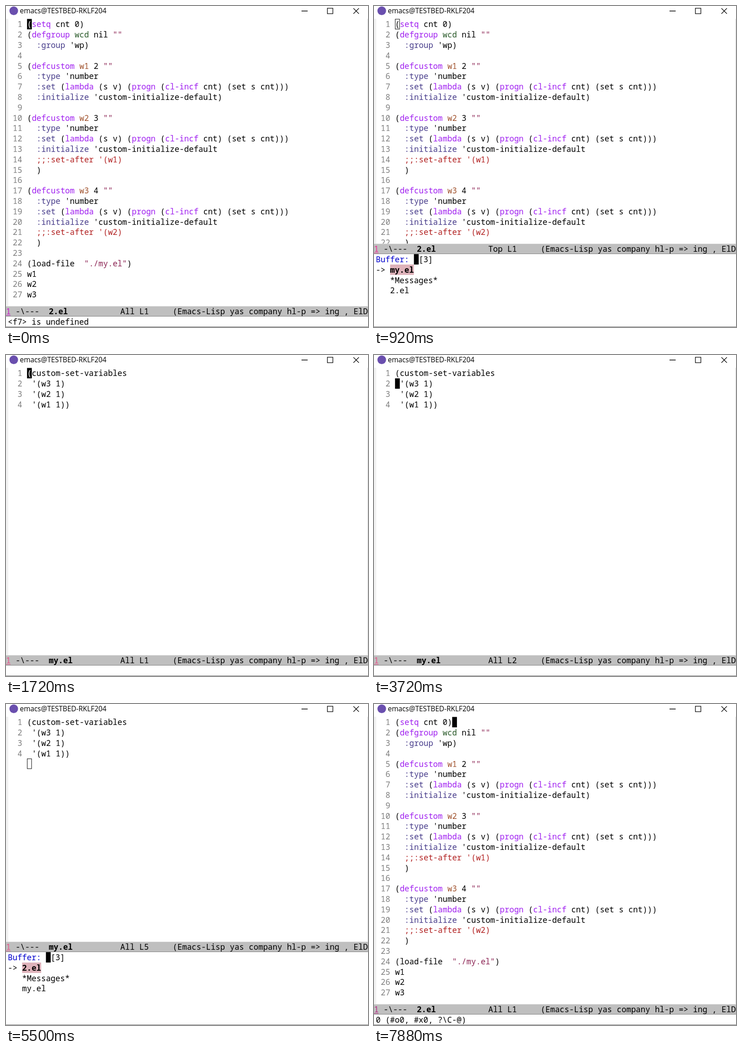
An HTML page with a canvas for the animation above (8 s loop, 795 by 704 pixels).

```html
<!DOCTYPE html>
<html lang="en">
<head>
<meta charset="utf-8">
<title>Editor session</title>
<style>
  html, body { margin: 0; width: 100%; height: 100%; overflow: hidden; background: #fff; }
  canvas { display: block; }
</style>
</head>
<body>
<canvas id="stage" width="795" height="704"></canvas>
<script>
const ctx = document.getElementById('stage').getContext('2d');
const LOOP = 8000, CELL = 10.458, ROW = 22.8;
const TEXT_X = 46.2, TEXT_Y = 28.4, BASELINE = 17.9;
const MONO = '17.43px "Noto Sans Mono", monospace';

const option = (name, value, after) => `(defcustom ${name} ${value} ""
  :type 'number
  :set (lambda (s v) (progn (cl-incf cnt) (set s cnt)))
  :initialize 'custom-initialize-default${after ? `\n  ;;:set-after '(${after})\n  ` : ''})
`;

const buffers = {
  '2.el': `(setq cnt 0)
(defgroup wcd nil ""
  :group 'wp)

${option('w1', 2)}
${option('w2', 3, 'w1')}
${option('w3', 4, 'w2')}
(load-file  "./my.el")
w1
w2
w3`.split('\n'),
  'my.el': `(custom-set-variables
 '(w3 1)
 '(w2 1)
 '(w1 1))`.split('\n')
};

const SYNTAX = new RegExp([
  '(?<comment>;;.*)',
  '(?<string>"[^"]*")',
  '(?<constant>:[a-z]+)',
  '(?<keyword>\\b(?:setq|defgroup|defcustom|lambda|progn|cl-incf)\\b)',
  '(?<variable>(?<=defcustom )w\\d)',
  '(?<type>\\bwcd\\b)',
  '(?<plain>[()]+|[^\\s:;"()]+)'
].join('|'), 'g');
const COLORS = {
  comment: '#b22222', string: '#8b2252', constant: '#483d8b', keyword: '#a020f0',
  variable: '#a0522d', type: '#2b5b2b', plain: '#000'
};

// Each entry changes only the listed properties of the state.
const timeline = [
  [0, { file: '2.el', line: 1, col: 0, echo: '<f7> is undefined', mark: '#c81ec8', choices: null, match: false }],
  [520, { echo: 'C-x-' }],
  [920, { echo: '', mark: '#ee2a96', choices: ['my.el', '*Messages*', '2.el'] }],
  [1650, { file: 'my.el', mark: '#e8528a', choices: null }],
  [3720, { line: 2 }],
  [3920, { line: 3 }],
  [4050, { line: 4, match: true }],
  [4250, { line: 5 }],
  [4450, { match: false }],
  [5240, { echo: 'C-x-' }],
  [5500, { echo: '', choices: ['2.el', '*Messages*', 'my.el'] }],
  [6690, { file: '2.el', line: 1, mark: '#b42a84', choices: null }],
  [7350, { col: 12 }],
  [7680, { echo: 'C-x-' }],
  [7880, { echo: '0 (#o0, #x0, ?\\C-@)' }]
];

function rect(x, y, w, h, color) {
  ctx.fillStyle = color;
  ctx.fillRect(x, y, w, h);
}

function text(string, x, y, color = '#000', font = MONO) {
  ctx.font = font;
  ctx.fillStyle = color;
  ctx.fillText(string, x, y);
}

function drawTitleBar() {
  ctx.fillStyle = '#6a4fae';
  ctx.beginPath();
  ctx.arc(17, 10.5, 9.5, 0, Math.PI * 2);
  ctx.fill();
  text('emacs@TESTBED-RKLF204', 30.5, 16, '#000', '15.4px "Open Sans", sans-serif');
  ctx.strokeStyle = '#000';
  ctx.lineWidth = 1.3;
  ctx.beginPath();
  ctx.moveTo(649, 11); ctx.lineTo(662.5, 11);
  ctx.rect(705.8, 4.8, 12, 12);
  ctx.moveTo(763, 5); ctx.lineTo(775, 17);
  ctx.moveTo(775, 5); ctx.lineTo(763, 17);
  ctx.stroke();
}

function drawCode(lines) {
  lines.forEach((line, i) => {
    const y = TEXT_Y + i * ROW + BASELINE;
    text(String(i + 1), TEXT_X - CELL * (String(i + 1).length + 1), y, '#7f7f7f');
    for (const token of line.matchAll(SYNTAX)) {
      const kind = Object.keys(COLORS).find(name => token.groups[name] !== undefined);
      text(token[0], TEXT_X + token.index * CELL, y, COLORS[kind]);
    }
  });
}

function drawCursor({ line, col, choices }, lines) {
  const x = TEXT_X + col * CELL, y = TEXT_Y + (line - 1) * ROW;
  if (choices) {
    ctx.strokeStyle = '#000';
    ctx.lineWidth = 1;
    ctx.strokeRect(x + .5, y + .5, CELL - 1, ROW - 1);
  } else {
    rect(x, y, CELL, ROW, '#000');
    text((lines[line - 1] || '')[col] || '', x, y + BASELINE, '#fff');
  }
}

function drawMatch(lines) {
  const last = lines.length - 1;
  [[0, 0], [last, lines[last].length - 1]].forEach(([row, col]) =>
    text(lines[row][col], TEXT_X + col * CELL, TEXT_Y + row * ROW + BASELINE, '#3a5fcd'));
}

function drawModeLine({ file, line, mark, choices }, y) {
  const at = (string, col, color, font) => text(string, col * CELL, y + 18, color, font);
  rect(0, y, 795, 23, '#bfbfbf');
  rect(0, y, 795, 1, '#e2e2e2');
  rect(0, y + 22, 795, 1, '#808080');
  at('1', 0, mark);
  rect(0, y + 20, 10, 1, mark);
  at('-\\---', 2);
  at(file, 9, '#000', 'bold ' + MONO);
  at(`${choices && file === '2.el' ? 'Top' : 'All'} L${line}`, 24);
  at('(Emacs-Lisp yas company hl-p => ing , ElD', 35);
}

function drawChoices(choices) {
  const at = (string, col, row, color, font) =>
    text(string, 4 + col * CELL, 562 + row * ROW, color, font);
  at('Buffer:', 0, 0, '#0000cd');
  rect(4 + 8 * CELL, 544.2, CELL, ROW, '#000');
  at('[3]', 9, 0);
  at('->', 0, 1);
  rect(4 + 3 * CELL, 567, choices[0].length * CELL, ROW, '#deb2ba');
  choices.forEach((name, i) => at(name, 3, i + 1, '#000', i ? MONO : 'bold ' + MONO));
}

function draw(time) {
  const state = Object.assign({}, ...timeline.filter(([start]) => start <= time).map(([, change]) => change));
  const lines = buffers[state.file];
  const modeY = state.choices ? 521 : 658;

  rect(0, 0, 795, 704, '#fff');
  drawTitleBar();
  rect(0, 28, 5, modeY - 28, '#f2f2f2');
  rect(793, 28, 2, modeY - 28, '#ececec');

  ctx.save();
  ctx.beginPath();
  ctx.rect(0, 28, 795, modeY - 28);
  ctx.clip();
  drawCode(lines);
  if (state.match) drawMatch(lines);
  drawCursor(state, lines);
  ctx.restore();

  drawModeLine(state, modeY);
  if (state.choices) drawChoices(state.choices);
  else text(state.echo, 4, 698.5);
  rect(0, 703, 795, 1, '#777');
}

const begin = performance.now();
function tick() {
  draw((performance.now() - begin) % LOOP);
  requestAnimationFrame(tick);
}
tick();
</script>
</body>
</html>
```
